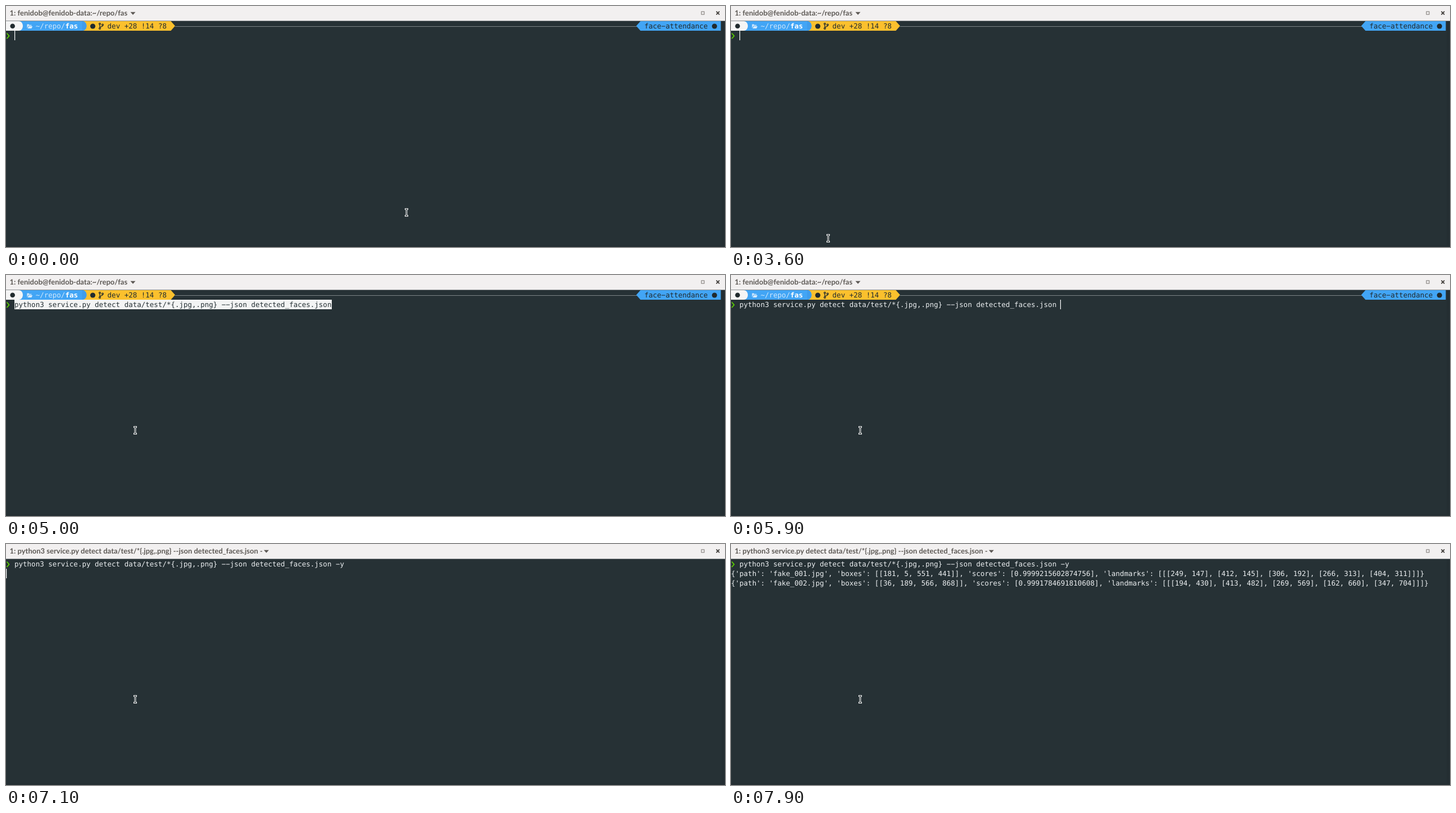
An HTML page that plays this animation: 1280 px wide and 429 px high, repeating every 8000 ms.

```html
<!DOCTYPE html>
<html lang="en">
<head>
<meta charset="utf-8">
<title>Terminal session</title>
<style>
  html, body { margin: 0; width: 100%; height: 100%; overflow: hidden; background: #263135; }
  svg { display: block; width: 100%; height: 100%; }
  text { white-space: pre; text-rendering: geometricPrecision; }
  .term { font: 12.5px "DejaVu Sans Mono", monospace; fill: #eceff1; }
  .title { font: 700 13px Lato, sans-serif; fill: #5d5955; }
  .dark { fill: #212b2e; }
</style>
</head>
<body>
<svg viewBox="0 0 1280 429">
  <rect width="1280" height="429" fill="#263135"/>
  <rect x="1274" y="27" width="6" height="402" fill="#242e32"/>
  <rect y="426" width="1280" height="3" fill="#242e32"/>

  <g id="bar">
    <rect width="1280" height="26.5" fill="#f2f0f0"/>
    <text id="title" class="title" x="6.5" y="17"></text>
    <path id="arrow" d="M-4.5 -2.2h9L0 2.8z" fill="#5d5955"/>
    <rect x="1238" y="10" width="5" height="5" fill="none" stroke="#77736f"/>
    <path d="M1264.5 9.7l5.6 5.6m0-5.6l-5.6 5.6" stroke="#3f3c39" stroke-width="1.8"/>
  </g>

  <g id="status">
    <path d="M136 27H293.5L301 35.5L293.5 44H136z" fill="#fbc02d"/>
    <path d="M22 27H135.5C146 27 146 44 135.5 44H22z" fill="#42a5f5"/>
    <path d="M135.5 27C146 27 146 44 135.5 44z" fill="#3f9ceb"/>
    <path d="M0 27H22.5C32.5 27 32.5 44 22.5 44H0z" fill="#f5f5f5"/>
    <circle class="dark" cx="11.7" cy="35.8" r="4.3"/>
    <path d="M37.5 39.5V32.5h3l1 1.2h4v1.6h-5.6zM40.6 36h6.6l-1.8 4h-7z" fill="#d3e9fc"/>
    <circle class="dark" cx="154.5" cy="36" r="4.6"/>
    <g fill="none" stroke="#212b2e" stroke-width="1.3">
      <path d="M167 33v6M172 35c0 2.4-5 1.2-5 4"/>
      <circle cx="167" cy="31.8" r="1.4"/>
      <circle cx="167" cy="40" r="1.4"/>
      <circle cx="172" cy="33.6" r="1.4"/>
    </g>
    <text class="term" x="52.7" y="40" style="fill:#cfe7fc">~/repo/<tspan font-weight="700" fill="#fff">fas</tspan></text>
    <text class="term dark" x="180.6" y="40" style="fill:#212b2e">dev +28 !14 ?8</text>
    <path d="M301 36.5H1123" stroke="#7d8486"/>
    <path d="M1272.500 27H1129.500L1122 35.500L1129.500 44H1272.500z" fill="#42a5f5"/>
    <text id="env" class="term" x="1136.500" y="40" style="fill:#212b2e"></text>
    <circle class="dark" cx="1261.300" cy="36" r="4.600"/>
  </g>

  <rect id="select" x="15" y="44" width="565" height="17" fill="#f3f4f4"/>
  <path id="mark" d="M1.500 -4.500L5.500 .2L1.500 5" fill="none" stroke="#5fd700" stroke-width="1.700"/>
  <text id="cmd" class="term" x="15"></text>
  <text id="out1" class="term" x="0" y="57"></text>
  <text id="out2" class="term" x="0" y="74"></text>
  <rect id="caret" width="1.200" height="17" fill="#fff"/>
  <g id="mouse" fill="none" stroke-linecap="square">
    <path d="M-1.500 -6H1.500M0 -6V6M-1.500 6H1.500" stroke="#f4f6f6" stroke-width="3"/>
    <path d="M-1.500 -6H1.500M0 -6V6M-1.500 6H1.500" stroke="#1b2326" stroke-width="1"/>
  </g>
</svg>
<script>
const LOOP = 8000, CELL = 7.525, ROW = 17;
const COMMAND = 'python3 service.py detect data/test/*{.jpg,.png} --json detected_faces.json';
const OUTPUT = [
  "{'path': 'fake_001.jpg', 'boxes': [[181, 5, 551, 441]], 'scores': [0.9999215602874756], 'landmarks': [[[249, 147], [412, 145], [306, 192], [266, 313], [404, 311]]]}",
  "{'path': 'fake_002.jpg', 'boxes': [[36, 189, 566, 868]], 'scores': [0.9991784691810608], 'landmarks': [[[194, 430], [413, 482], [269, 569], [162, 660], [347, 704]]]}"
];

const $ = id => document.getElementById(id);
const show = (id, on) => $(id).setAttribute('visibility', on ? 'visible' : 'hidden');
const move = (id, x, y) => $(id).setAttribute('transform', `translate(${x} ${y})`);
const setText = (id, s) => { if ($(id).textContent !== s) $(id).textContent = s; };
// the terminal face has wide hyphens
const wide = s => s.replace(/-/g, '\u2212');

function typed(t) {
  if (t < 5000) return '';
  if (t < 5900) return COMMAND;
  return COMMAND + (t < 6500 ? ' ' : t < 6900 ? ' -' : ' -y');
}

function drawMouse(t) {
  show('mouse', t < 100 || t >= 3600);
  if (t < 3600) return move('mouse', 713, 367.5);
  const step = Math.min(4, Math.floor((t - 3600) / 100));
  const p = 1 - (1 - step / 4) ** 1.5;
  move('mouse', Math.round(173 + 57 * p), Math.round(413 - 137 * p) + 0.5);
}

function draw(t) {
  const running = t >= 7100;
  const selected = t >= 5000 && t < 5900;
  const line = typed(t);
  const row = running ? 0 : 1;

  setText('title', running ? `1: ${COMMAND} -` : '1: fenidob@fenidob-data:~/repo/fas');
  move('arrow', running ? 463.5 : 226, 13);
  show('status', !running);
  show('select', selected);

  move('mark', 0, 36 + ROW * row);
  setText('cmd', wide(line));
  $('cmd').setAttribute('y', 40 + ROW * row);
  $('cmd').style.fill = selected ? '#263135' : '';

  show('caret', !selected && t < 7700);
  move('caret', running ? 0 : Math.floor(15 + line.length * CELL), 44);

  setText('out1', t >= 7800 ? OUTPUT[0] : '');
  setText('out2', t >= 7900 ? OUTPUT[1] : '');
  drawMouse(t);
}

setText('env', wide('face-attendance'));
const start = performance.now();
function tick() {
  draw((performance.now() - start) % LOOP);
  requestAnimationFrame(tick);
}
tick();
</script>
</body>
</html>
```
